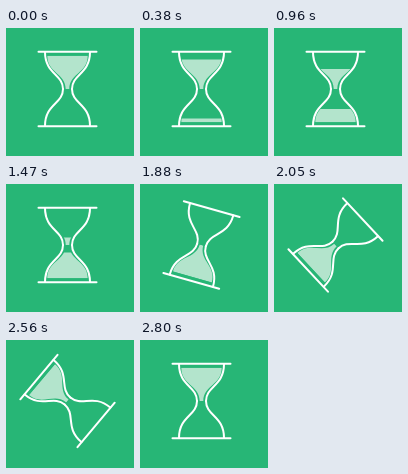
Write an HTML page that moves like this. It is 128 px wide and 128 px high and loops after 3100 ms.

```html
<!DOCTYPE html>
<html lang="en">
<head>
<meta charset="utf-8">
<title>Hourglass</title>
<style>
  html, body { margin: 0; width: 100%; height: 100%; overflow: hidden; background: #27b676; }
  svg { display: block; width: 100vw; height: 100vh; }
</style>
</head>
<body>
<svg viewBox="0 0 128 128">
  <defs>
    <clipPath id="upper"><rect id="upperLevel" x="-30" width="60"/></clipPath>
    <clipPath id="lower"><rect id="lowerLevel" x="-30" width="60"/></clipPath>
    <path id="bulb" d="M-20.2-33.3H20.2C20.2-16 2-16 1.8 0H-1.8C-2-16-20.2-16-20.2-33.3Z"/>
    <g id="half">
      <path d="M-29-37.3H29"/>
      <path d="M-22.5-37C-22.5-15-4.5-15-4.5 0M22.5-37C22.5-15 4.5-15 4.5 0"/>
    </g>
  </defs>
  <rect width="128" height="128" fill="#27b676"/>
  <g id="glass">
    <g fill="#b3e4cc">
      <g clip-path="url(#upper)"><use href="#bulb"/></g>
      <g clip-path="url(#lower)"><use href="#bulb" transform="scale(1 -1)"/></g>
    </g>
    <g fill="none" stroke="#fff" stroke-width="2" stroke-linecap="round">
      <use href="#half"/>
      <use href="#half" transform="scale(1 -1)"/>
    </g>
  </g>
</svg>
<script>
  const LOOP = 3100, TURN_START = 1790, TURN_END = 2790, STEP = 57.6, DEPTH = 33.3;
  const byId = id => document.getElementById(id);
  const glass = byId('glass'), upper = byId('upperLevel'), lower = byId('lowerLevel');
  const clamp = (v, lo, hi) => Math.min(hi, Math.max(lo, v));

  // Hold each pose for one step; the steps line up with the end of the turn.
  const snap = t => t < 58 ? 0 : 2800 + Math.floor((t + 6 - 2800) / STEP) * STEP;

  // The level sinks faster as the bulb narrows.
  function drained(t) {
    const s = t / 1000;
    return t >= 1700 ? DEPTH : clamp(7 * s + 7.13 * s * s, 0, DEPTH);
  }

  function setLevel(rect, y, height) {
    rect.setAttribute('y', y);
    rect.setAttribute('height', height);
  }

  function draw(time) {
    const t = snap(time % LOOP);
    const drop = drained(t);
    const angle = 180 * clamp((t - TURN_START) / (TURN_END - TURN_START), 0, 1);
    setLevel(upper, drop - DEPTH, DEPTH - drop);
    setLevel(lower, DEPTH - drop, drop);
    glass.setAttribute('transform', `translate(61.5 61) rotate(${angle})`);
  }

  const start = performance.now();
  function tick() {
    draw(performance.now() - start);
    requestAnimationFrame(tick);
  }
  draw(0);
  requestAnimationFrame(tick);
</script>
</body>
</html>
```
